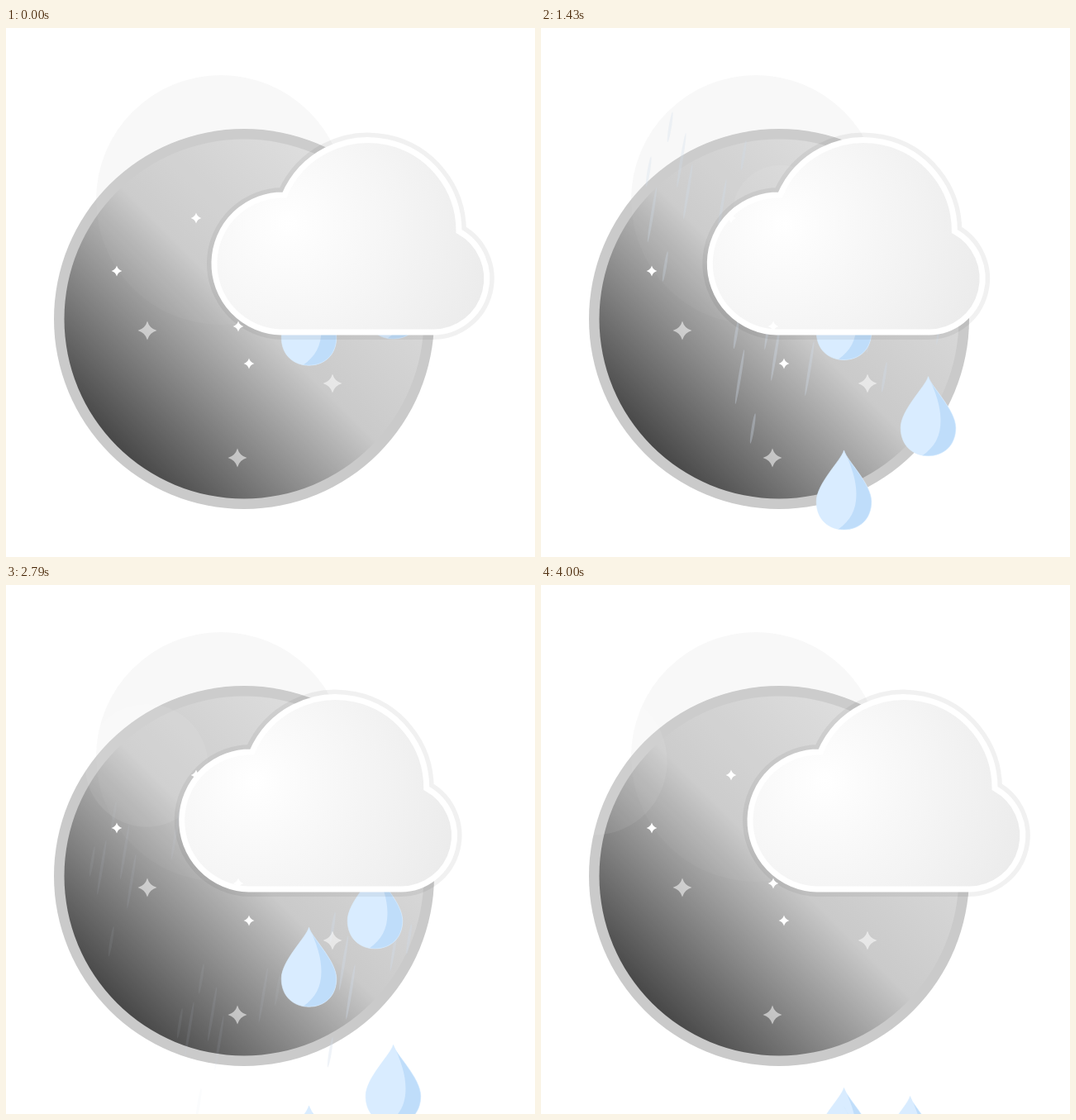
Write an HTML page with a canvas that moves like this. It is 640 px wide and 640 px high and loops after 4070 ms.

```html
<!DOCTYPE html>
<html lang="en">
<head>
<meta charset="utf-8">
<title>Rainy night</title>
<style>
html, body { margin: 0; width: 100%; height: 100%; overflow: hidden; background: #fff; }
canvas { display: block; }
</style>
</head>
<body>
<canvas width="640" height="640"></canvas>
<script>
const ctx = document.querySelector('canvas').getContext('2d');
const LOOP = 4.07, TURN = 1.985, RUSH = 3.14, SLANT = 6.2;

const cloudPath = new Path2D('M333 368A83 83 0 0 1 337 202A110 110 0 0 1 548 246A65 65 0 0 1 517 368Z');
const dropPath = new Path2D('M0 0C3 12 33.3 40 33.3 62C33.3 84 18 96 0 96S-33.3 84 -33.3 62C-33.3 40 -3 12 0 0Z');
const dropShade = new Path2D('M0 0C9 18 15 36 15 53C15 72 8 85 -7 95.5L0 96C18 96 33.3 84 33.3 62C33.3 40 3 12 0 0Z');
const starPath = new Path2D('M0 -1Q.22 -.22 1 0Q.22 .22 0 1Q-.22 .22 -1 0Q-.22 -.22 0 -1Z');

const discFill = ctx.createLinearGradient(134.5, 505.5, 441.5, 198.5);
discFill.addColorStop(0, '#484848');
discFill.addColorStop(.52, '#cacaca');
discFill.addColorStop(1, '#dedede');
const cloudFill = ctx.createRadialGradient(342, 237, 0, 342, 237, 255);
cloudFill.addColorStop(0, '#fff');
cloudFill.addColorStop(1, '#ebebeb');

// One cluster of rain as [x, y, speed], short and long lines in turn, seen in three places
const cluster = [[151, 152, 118], [167, 178, 120], [125, 206, 118], [175, 215, 118],
  [146, 315, 105], [134, 229, 85], [241, 180, 103], [220, 209, 62]];
const showers = [
  { dx: 0, dy: 0, from: 1, to: 2.9 },
  { dx: 106, dy: 196, from: .1, to: 2.9 },
  { dx: 265, dy: 134, from: .6, to: 3.25 }
];

const drops = [
  { x: 366.5, y: 191, speed: 80, rush: 113 },
  { x: 366.5, y: 312, speed: 139, end: 630 },
  { x: 468.5, y: 280, speed: 99 },
  { x: 446.5, y: 62, speed: 101, rush: 177 }
];

const smallStars = [[230, 230], [134, 294], [281, 361], [294, 406]];
const largeStars = [[171, 366], [280, 520], [395, 430]];

const clamp = v => Math.min(1, Math.max(0, v));

function disc(x, y, r, fill) {
  ctx.fillStyle = fill;
  ctx.beginPath();
  ctx.arc(x, y, r, 0, 7);
  ctx.fill();
}

function at(x, y, draw) {
  ctx.save();
  ctx.translate(x, y);
  draw();
  ctx.restore();
}

function drawGlow(t) {
  const s = t - 1.86;
  disc(252 - 88 * s, 222 - 4 * s, 63 + 12.2 * s, 'rgba(255,255,255,.07)');
}

function drawRain(t) {
  ctx.fillStyle = '#d0dcea';
  for (const { dx, dy, from, to } of showers) {
    ctx.globalAlpha = .34 * clamp((t - from) / .5) * clamp((to - t) / .45);
    cluster.forEach(([x, y, speed], i) => {
      const half = i % 2 ? 33.5 : 18.5, fall = speed * (t - 1.86) + half;
      ctx.beginPath();
      ctx.ellipse(x + dx - fall / SLANT, y + dy + fall, 1.7, half, 1 / SLANT, 0, 7);
      ctx.fill();
    });
  }
  ctx.globalAlpha = 1;
}

function drawDrop(t, { x, y, speed, rush = 0, end = 700 }) {
  const tip = y + speed * t + rush * Math.max(0, t - RUSH);
  at(x, Math.min(end, Math.max(250, tip)), () => {
    ctx.fillStyle = '#d9ecff';
    ctx.fill(dropPath);
    ctx.fillStyle = '#bfddfa';
    ctx.fill(dropShade);
    ctx.strokeStyle = '#d9ecff';
    ctx.lineWidth = .6;
    ctx.stroke(dropPath);
  });
}

function drawCloud(t) {
  const outline = (color, width) => {
    ctx.strokeStyle = color;
    ctx.lineWidth = width;
    ctx.stroke(cloudPath);
  };
  at(33.3 * (Math.abs(t - TURN) - TURN), 0, () => {
    outline('rgba(0,0,0,.055)', 18);
    ctx.fillStyle = cloudFill;
    ctx.fill(cloudPath);
    outline('#fff', 7);
  });
}

function drawStars(points, r, fill) {
  for (const [x, y] of points) at(x, y, () => {
    ctx.scale(r, r);
    ctx.fillStyle = fill;
    ctx.fill(starPath);
  });
}

function render(t) {
  ctx.clearRect(0, 0, 640, 640);
  disc(260, 208, 151, '#f8f8f8');
  disc(288, 352, 230, '#cacaca');
  disc(288, 352, 217.5, discFill);
  disc(260, 208, 151, 'rgba(255,255,255,.03)');
  drawGlow(t);
  drawRain(t);
  drops.forEach(drop => drawDrop(t, drop));
  drawCloud(t);
  drawStars(smallStars, 6.4, '#fff');
  drawStars(largeStars, 11.5, 'rgba(255,255,255,.55)');
}

const start = performance.now();
function tick() {
  render((performance.now() - start) / 1000 % LOOP);
  requestAnimationFrame(tick);
}
tick();
</script>
</body>
</html>
```
